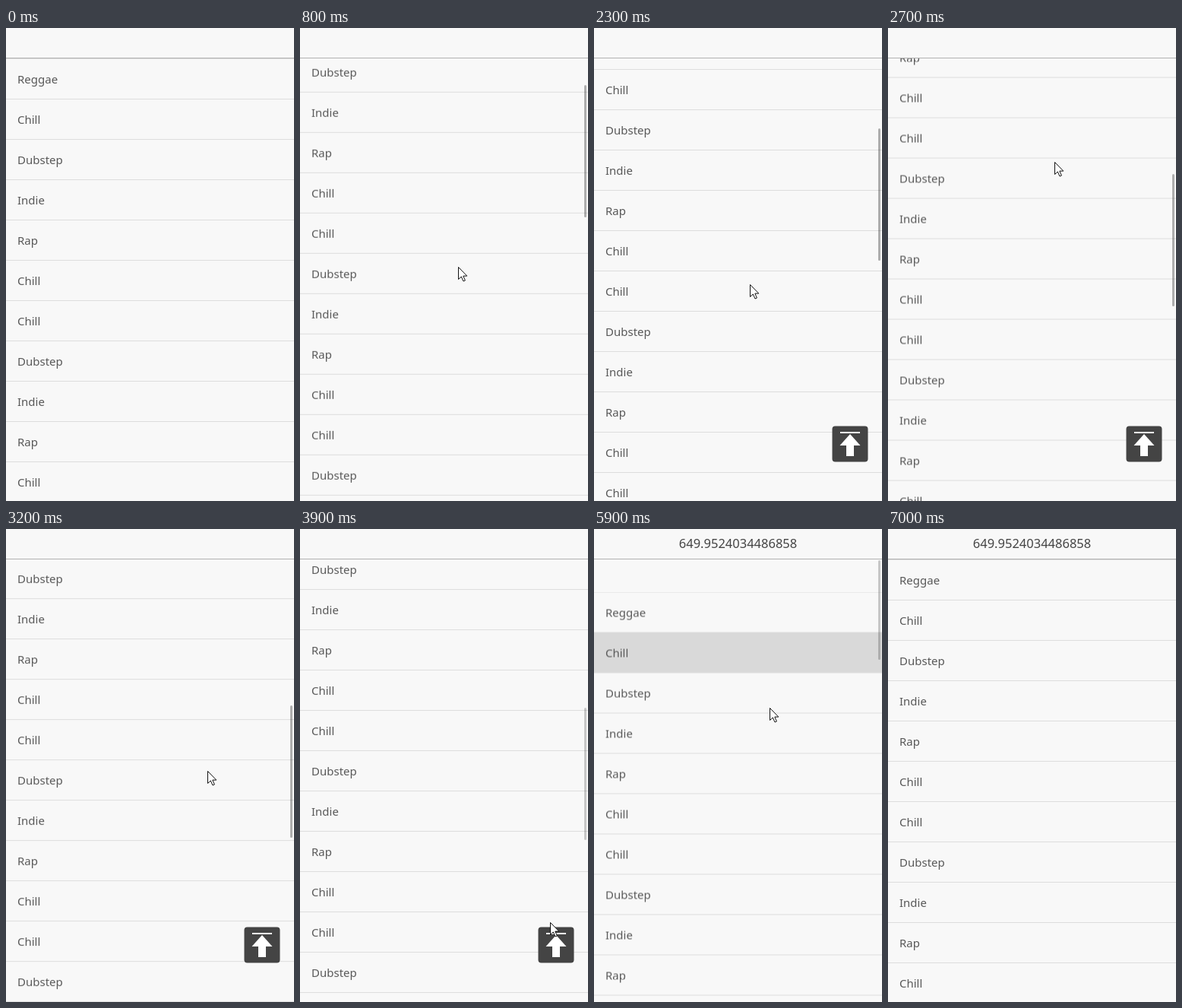
Recreate the animation shown at these times as an HTML page. Size 379x622 px, loop 7.5 s.

```html
<!DOCTYPE html>
<html lang="en">
<head>
<meta charset="utf-8">
<title>Scrolling genre list</title>
<style>
  html, body { margin: 0; width: 100%; height: 100%; overflow: hidden; background: #f8f8f8; }
  body { position: relative; color: #585858; font: 15px "Noto Sans", "Open Sans", sans-serif; }
  header {
    position: absolute; left: 0; top: 0; width: 379px; height: 40px; box-sizing: border-box;
    border-bottom: 1px solid #b2b2b2; color: #444; text-align: center;
    font-size: 16.5px; font-weight: 500; line-height: 38px;
  }
  #view { position: absolute; left: 0; top: 40px; width: 379px; height: 582px; overflow: hidden; }
  #list { will-change: transform; background: #f8f8f8; }
  .row {
    height: 54px; box-sizing: border-box; margin-bottom: -1px; padding-left: 15px;
    border: solid #ddd; border-width: 1px 0; line-height: 52px;
  }
  .active { background: #d9d9d9; }
  #bar { position: absolute; left: 374px; top: 0; width: 3px; border-radius: 2px; background: rgba(0, 0, 0, .3); }
  svg { position: absolute; left: 0; top: 0; overflow: visible; }
</style>
</head>
<body>
<header id="title"></header>
<div id="view"><div id="list"></div></div>
<div id="bar"></div>
<svg width="379" height="622">
  <g id="topButton">
    <rect x="313.5" y="523.5" width="47" height="47" rx="4" fill="#444"/>
    <path fill="#fff" d="M324 531h26v2h-26zM337 534l13.5 15h-8.5v14h-10v-14h-8.5z"/>
  </g>
  <path id="cursor" d="M.5 .5V16.5L4.3 13L7 19L9.4 18L6.8 12.1H11.8Z" fill="#fff" stroke="#111"/>
</svg>
<script>
const LOOP = 7500, STEP = 100, LAST = 7000;
const THUMB = 174, TRACK = 582, BOTTOM = 649.95;
const JUMP = 4700, PRESS = 5700, RELEASE = 6100;
const genres = ["Chill", "Dubstep", "Indie", "Rap", "Chill"];
const $ = id => document.getElementById(id);

const clamp = v => Math.min(1, Math.max(0, v));
const easeOut = p => 1 - (1 - clamp(p)) ** 3;
const fade = (t, on, off) => clamp((t - on) / 300) - clamp((t - off) / 300);

// Three flicks down, the jump to the top, then a pull past the edge and its rebound.
const moves = [
  { at: 500, lasts: 400, by: 117 },
  { at: 1700, lasts: 600, by: 187 },
  { at: 2400, lasts: 1188, by: BOTTOM - 304 },
  { at: JUMP - STEP, lasts: STEP, by: -BOTTOM },
  { at: PRESS, lasts: 400, by: -48.6 },
  { at: RELEASE, lasts: 400, by: 48.6 }
];
const scrollAt = t => moves.reduce((sum, m) => sum + m.by * easeOut((t - m.at) / m.lasts), 0);

// Turning points of the pointer: [time, x, y]
const path = [
  [0, 385, 470], [500, 209, 402], [900, 207, 285], [1500, 207, 285], [2000, 213, 232],
  [2300, 205, 337], [2700, 219, 176], [3900, 329, 517], [4300, 337, 546], [JUMP, 337, 546],
  [PRESS, 231, 148], [5900, 231, 235], [RELEASE, 231, 246], [6800, 390, 25], [LOOP, 390, 25]
];

function pointerAt(t) {
  const i = path.findIndex(point => point[0] > t);
  const [t0, x0, y0] = path[i - 1], [t1, x1, y1] = path[i];
  const p = (t - t0) / (t1 - t0);
  return [x0 + (x1 - x0) * p, y0 + (y1 - y0) * p].map(Math.round);
}

const rows = Array.from({ length: 36 }, (_, i) => {
  const row = document.createElement("div");
  row.className = "row";
  row.textContent = i ? genres[(i - 1) % genres.length] : "Reggae";
  $("list").append(row);
  return row;
});

function draw(time) {
  const t = Math.min(LAST, Math.floor(time % LOOP / STEP) * STEP);
  const scroll = scrollAt(t);
  const thumbTop = 41 + Math.max(0, scroll) * THUMB / TRACK;

  $("list").style.transform = `translateY(${-scroll}px)`;
  $("bar").style.transform = `translateY(${Math.round(thumbTop)}px)`;
  $("bar").style.height = THUMB + Math.min(0, scroll) + "px";
  $("bar").style.opacity = fade(t, 500, 3800) + fade(t, PRESS, 6700);
  $("cursor").setAttribute("transform", `translate(${pointerAt(t)})`);
  $("topButton").style.display = scroll > 250 ? "" : "none";
  $("title").textContent = t >= JUMP ? BOTTOM + "24034486858" : "";
  rows[1].classList.toggle("active", t >= PRESS && t <= RELEASE);
}

const start = performance.now();
function tick() {
  draw(performance.now() - start);
  requestAnimationFrame(tick);
}
tick();
</script>
</body>
</html>
```
